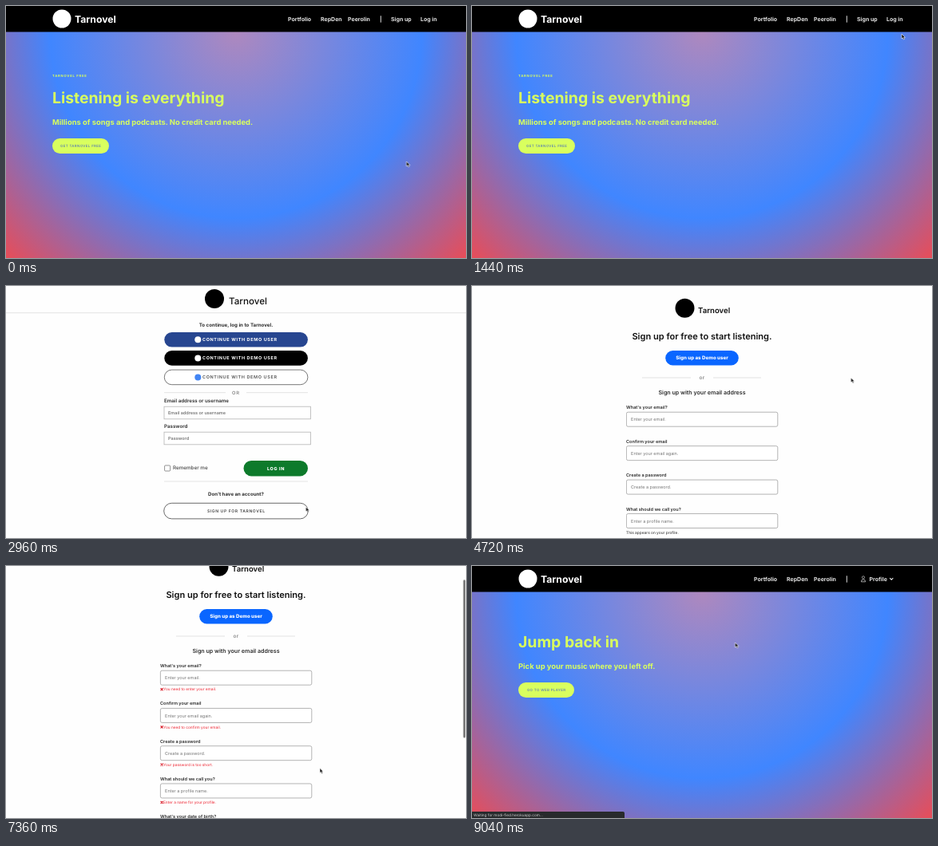
These frames come from a looping animation (576x316 px, 9120 ms). An HTML page:

```html
<!DOCTYPE html>
<html lang="en">
<head>
<meta charset="utf-8">
<title>Music site walkthrough</title>
<style>
  html, body { margin: 0; width: 100%; height: 100%; overflow: hidden; background: #fff; }
  svg { display: block; width: 100%; height: 100%; }
  text { font-family: Inter, "Open Sans", sans-serif; text-rendering: geometricPrecision; }
</style>
</head>
<body>
<svg id="stage" viewBox="0 0 576 316" xmlns="http://www.w3.org/2000/svg"></svg>
<script>
const LOOP = 9120, STEP = 80;
const BRAND = 'Tarnovel';
const LIME = '#d9ff5e', INK = '#2c2c2c', GREY = '#777', RULE = '#dcdcdc';

// y is the middle of the capitals
const text = (x, y, size, str, { fill = INK, weight = 700, anchor = 'start', gap = 0 } = {}) =>
  `<text x="${x}" y="${y + size * 0.36}" font-size="${size}" font-weight="${weight}" fill="${fill}"
    text-anchor="${anchor}" letter-spacing="${gap}">${str}</text>`;
const mid = (x, y, size, str, opts = {}) => text(x, y, size, str, { anchor: 'middle', ...opts });
const box = (x, y, w, h, fill, { r = 0, stroke = 'none', line = 0.8 } = {}) =>
  `<rect x="${x}" y="${y}" width="${w}" height="${h}" rx="${r}" fill="${fill}" stroke="${stroke}" stroke-width="${line}"/>`;
const pill = (x, y, w, h, fill, stroke) => box(x, y, w, h, fill, { r: h / 2, stroke });
const dot = (x, y, r, fill, stroke = 'none') =>
  `<circle cx="${x}" cy="${y}" r="${r}" fill="${fill}" stroke="${stroke}" stroke-width=".6"/>`;
const rule = (x1, x2, y) => `<path d="M${x1} ${y}H${x2}" stroke="${RULE}" stroke-width=".8"/>`;
const stroke = (d, color, width) =>
  `<path d="${d}" fill="none" stroke="${color}" stroke-width="${width}" stroke-linecap="round"/>`;

const navItem = (x, label) => text(x, 16, 7, label, { fill: '#e4e4e4' });

const hero = (nav, body) => `
  <rect width="576" height="316" fill="url(#glow)"/>
  <rect width="576" height="32.5" fill="#000"/>
  ${dot(70, 16, 11.5, '#fff')}
  ${text(86, 16.3, 12.2, BRAND, { fill: '#fff' })}
  ${navItem(353, 'Portfolio')}${navItem(394, 'RepDen')}${navItem(428, 'Peerolin')}${navItem(468, '|')}
  ${nav}${body}`;

const pitch = (y, title, line, button, width) => `
  ${text(58, y, 19.4, title, { fill: LIME })}
  ${text(58, y + 30.3, 9.4, line, { fill: LIME })}
  ${pill(58, y + 51, width, 19, LIME)}
  ${mid(58.2 + width / 2, y + 60.3, 4.4, button, { fill: '#5578b4', weight: 500, gap: 0.36 })}`;

const home = hero(
  navItem(482, 'Sign up') + navItem(519, 'Log in'),
  text(58, 87.5, 4.2, BRAND.toUpperCase() + ' FREE', { fill: LIME, gap: 0.75 }) +
  pitch(115, 'Listening is everything', 'Millions of songs and podcasts. No credit card needed.',
    `GET ${BRAND.toUpperCase()} FREE`, 71));

const welcome = hero(
  dot(490, 14.3, 1.6, 'none', '#e4e4e4') +
  stroke('M487.4 19.4q0-2.6 2.6-2.6t2.6 2.6z', '#e4e4e4', 0.7) +
  navItem(497.5, 'Profile') + stroke('M523.4 15.3l1.8 1.8l1.8-1.8', '#e4e4e4', 1.1),
  pitch(95, 'Jump back in', 'Pick up your music where you left off.', 'GO TO WEB PLAYER', 70) +
  box(-3, 308, 194, 12, '#282a2c', { r: 2 }) +
  text(2, 312.2, 4.7, 'Waiting for modi-fied.herokuapp.com...', { fill: '#ccc', weight: 400 }));

const demoButton = (y, fill, color, mark, edge) =>
  pill(198.3, y - 9.3, 179.6, 18.6, fill, edge) + dot(240.3, y, 4, mark) +
  text(246, y, 5.5, 'CONTINUE WITH DEMO USER', { fill: color, gap: 0.62, weight: edge ? 600 : 700 });

const loginField = (y, label) =>
  text(198, y, 6.2, label, { weight: 600 }) +
  box(198, y + 7.7, 183.5, 15.6, '#fff', { stroke: '#b5b5b5' }) +
  text(203, y + 15.5, 5.5, label, { fill: GREY, weight: 600 });

const login = `
  <rect width="576" height="316" fill="#fefefe"/>
  ${rule(0, 576, 33.7)}
  ${dot(261, 16, 12, '#000')}
  ${text(279, 18.6, 11.6, BRAND, { weight: 500, fill: '#111' })}
  ${mid(288, 49, 6.2, `To continue, log in to ${BRAND}.`)}
  ${demoButton(67.3, '#274690', '#fff', '#fff')}
  ${demoButton(90.4, '#000', '#fff', '#fff')}
  ${demoButton(114.4, '#fff', '#555', '#4285f4', '#555')}
  ${rule(198, 275, 133.7)}${mid(288, 133.5, 5.8, 'OR', { fill: GREY, weight: 500, gap: 0.8 })}${rule(301, 378, 133.7)}
  ${loginField(143.5, 'Email address or username')}
  ${loginField(175.5, 'Password')}
  ${box(198.6, 225, 7, 7, '#fff', { r: 1, stroke: GREY })}
  ${text(209, 228, 6.3, 'Remember me', { fill: '#444', weight: 500 })}
  ${pill(297.5, 219, 80.5, 19.4, '#0d7a2b')}
  ${mid(338, 228.7, 5.5, 'LOG IN', { fill: '#fff', weight: 800, gap: 0.6 })}
  ${rule(198, 378, 245)}
  ${mid(288, 261, 6.1, "Don't have an account?")}
  ${pill(197.7, 272.3, 180.5, 19.6, '#fff', '#444')}
  ${mid(288.3, 282.3, 5.1, `SIGN UP FOR ${BRAND.toUpperCase()}`, { fill: '#444', weight: 600, gap: 0.6 })}`;

const note = (y, str) =>
  stroke(`M193.9 ${y - 1.2}l2.4 2.4m0-2.4l-2.4 2.4`, '#d8202c', 1.1) +
  text(197, y, 4.75, str, { fill: '#f0404c', weight: 500 });

const input = (x, y, w, hint) =>
  box(x, y, w, 18, '#fff', { r: 2, stroke: '#8c8c8c', line: 0.65 }) +
  text(x + 5.7, y + 9.2, 5.5, hint, { fill: GREY, weight: 400 });

const FIELDS = [
  ["What's your email?", 'Enter your email.', 'You need to enter your email.'],
  ['Confirm your email', 'Enter your email again.', 'You need to confirm your email.'],
  ['Create a password', 'Create a password.', 'Your password is too short.'],
  ['What should we call you?', 'Enter a profile name.', 'Enter a name for your profile.'],
];

function form(failed) {
  const pitchY = failed ? 47.25 : 42.45;
  const label = (y, str) => text(193, y, 5.6, str, { weight: 600 });
  const fields = FIELDS.map(([name, hint, error], i) => {
    const y = 152.2 + i * pitchY;
    return label(y, name) + input(193.4, y + 6, 189.4, hint) + (failed ? note(y + 29.5, error) : '');
  }).join('');
  const date = 152.2 + 3 * pitchY + 47.2;
  const gender = date + (failed ? 66.8 : 52.3);
  const submit = gender + (failed ? 41 : 36);
  const caption = (x, str) => text(x, date + 10.4, 5.3, str, { fill: '#444', weight: 500 });
  const choice = (x, str) => dot(x, gender + 13.4, 2.3, '#fff', '#8c8c8c') +
    text(x + 5.6, gender + 13.2, 5.75, str, { fill: '#444', weight: 500 });
  return `${fields}
    ${failed ? '' : text(193, date - 17.2, 4.8, 'This appears on your profile.', { fill: '#444', weight: 500 })}
    ${label(date, "What's your date of birth?")}
    ${caption(193, 'Month')}${caption(288, 'Day')}${caption(339, 'Year')}
    ${input(193.4, date + 15.5, 71.4, '')}${text(201, date + 24.6, 5.6, 'Month')}
    ${stroke(`M259.4 ${date + 23.9}l1.6 1.6l1.6-1.6`, INK, 0.9)}
    ${input(288.3, date + 15.5, 27.4, 'DD')}${input(339.3, date + 15.5, 43.5, 'YYYY')}
    ${failed ? note(date + 39.8, 'Select your birth month.') + note(date + 44.7, 'Enter a valid day of the month.') +
      note(date + 49.4, 'Enter a valid year.') + note(gender + 21.8, 'Select your gender.') : ''}
    ${label(gender, "What's your gender?")}
    ${choice(198, 'Male')}${choice(239.5, 'Female')}${choice(281.5, 'Non-binary')}
    ${pill(265.7, submit, 44.4, 18.6, '#1fdb52')}
    ${mid(288, submit + 9, 6.6, 'Sign Up', { fill: '#0c3a18', gap: 0.15 })}`;
}

const signup = `
  <rect width="576" height="316" fill="#fefefe"/>
  <g id="page">
    ${dot(266.5, 27.8, 12, '#000')}
    ${text(283, 30.4, 9.6, BRAND, { weight: 600, fill: '#111' })}
    ${mid(288, 62.7, 11.05, 'Sign up for free to start listening.', { weight: 600, fill: '#111' })}
    ${pill(242.2, 81, 91.6, 18.4, '#0a66ff')}
    ${mid(288, 90, 6.2, 'Sign up as Demo user', { fill: '#fff', weight: 800 })}
    ${rule(213, 274, 115)}${mid(288, 114.6, 6.4, 'or', { fill: GREY, weight: 500, gap: 0.4 })}${rule(302, 362, 115)}
    ${mid(288, 133.8, 7.1, 'Sign up with your email address', { weight: 600 })}
    <g id="blank">${form(false)}</g>
    <g id="failed">${form(true)}</g>
  </g>
  <g id="bar"><rect id="thumb" x="572.6" width="2.6" height="198" rx="1.3" fill="#747474"/></g>`;

const stage = document.getElementById('stage');
stage.innerHTML = `
  <defs>
    <radialGradient id="glow" gradientUnits="userSpaceOnUse" cx="288" cy="33" r="412">
      <stop offset="0" stop-color="#ae88be"/>
      <stop offset=".565" stop-color="#4086ff"/>
      <stop offset="1" stop-color="#f04a50"/>
    </radialGradient>
  </defs>
  <g id="home">${home}</g>
  <g id="login">${login}</g>
  <g id="signup">${signup}</g>
  <g id="welcome">${welcome}</g>
  <path id="cursor" d="M0 0v6l1.4-1.2l1 2.2l1.2-.5l-1-2.1h1.8z" fill="#111" stroke="#fff" stroke-width=".6"/>`;

// Each segment advances in whole picture steps.
function play(id, track, toStyle) {
  const frames = track.map(([time, ...value], i) => ({
    offset: time / LOOP,
    easing: `steps(${i + 1 < track.length ? Math.max(1, Math.round((track[i + 1][0] - time) / STEP)) : 1}, end)`,
    ...toStyle(...value),
  }));
  document.getElementById(id).animate(frames, { duration: LOOP, iterations: Infinity });
}

const fade = opacity => ({ opacity });
const move = (x, y) => ({ transform: `translate(${x}px, ${y}px)` });

function show(id, from, to) {
  const track = [[0, from === 0 ? 1 : 0]];
  if (from > 0) track.push([from - STEP, 0], [from, 1]);
  if (to < LOOP) track.push([to - STEP, 1], [to, 0]);
  track.push([LOOP, to < LOOP ? 0 : 1]);
  play(id, track, fade);
}

show('home', 0, 1680);
show('login', 1680, 3280);
show('signup', 3280, 8880);
show('welcome', 8880, LOOP);
show('blank', 0, 5920);
show('failed', 5920, LOOP);

const scroll = [[0, 0], [4960, 0], [5120, 40], [5360, 115], [5600, 147], [6960, 147],
  [7120, 108], [7360, 27], [7520, 0], [LOOP, 0]];
play('page', scroll, y => move(0, -y));
play('thumb', scroll, y => move(0, 0.645 * y));
play('bar', [[0, 0], [4880, 0], [4960, 1], [6080, 1], [6400, 0.2], [6480, 0], [6880, 0], [6960, 1],
  [7760, 1], [8080, 0], [LOOP, 0]], fade);

play('cursor', [
  [0, 501.5, 195], [480, 510, 130], [880, 530, 14], [1120, 532, 16], [1440, 538, 35], [1920, 531, 36],
  [2160, 515, 64], [2560, 400, 250], [2800, 375.5, 277], [3040, 375.5, 277], [3360, 380, 270],
  [3840, 410, 225], [4400, 494, 150], [4720, 474.5, 115], [5040, 474, 116], [5680, 290, 273],
  [5920, 288, 275], [6080, 310, 272], [6400, 392, 256.5], [7360, 393, 253.5], [7680, 393, 253.5],
  [8080, 356, 150], [8400, 332, 93], [8720, 330, 92], [9040, 329.5, 96], [LOOP, 329.5, 96],
], move);
</script>
</body>
</html>
```
